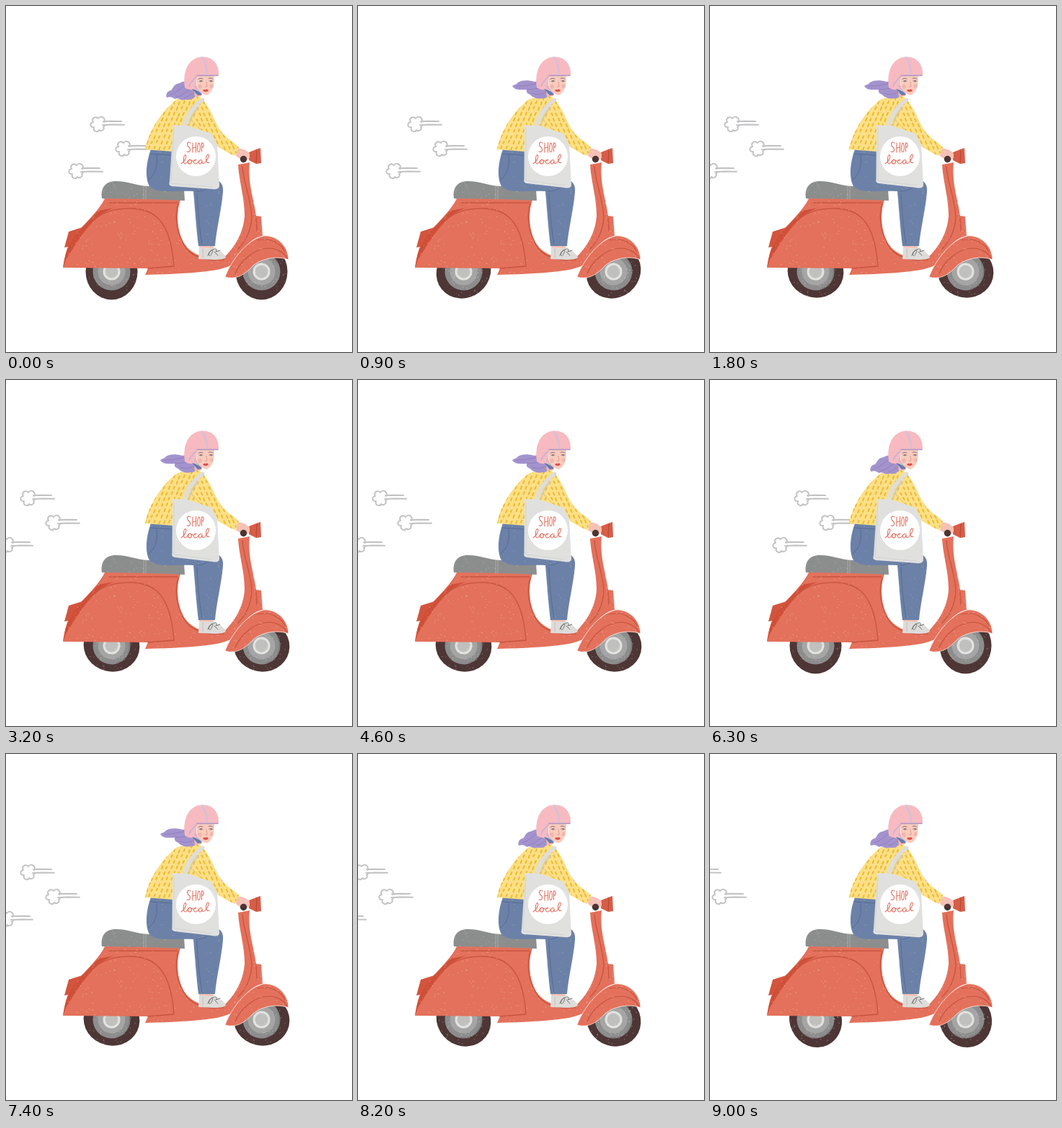
Recreate the animation shown at these times as an HTML page. Size 480x480 px, loop 9.1 s.

```html
<!DOCTYPE html>
<html lang="en">
<head>
<meta charset="utf-8">
<title>Scooter ride</title>
<style>
html, body { margin: 0; width: 100%; height: 100%; overflow: hidden; background: #fff; }
svg { display: block; width: 100%; height: 100%; }
.line { fill: none; stroke-linecap: round; stroke-linejoin: round; }
</style>
</head>
<body>
<svg viewBox="0 0 480 480" role="img" aria-label="Woman on a scooter with a bag reading: SHOP local">
  <defs>
    <path id="body" d="M79 363C82 346 84 332 97 316C106 305 129 284 137 267L243 267C235 285 237 315 249 332C256 341 265 346 280 349L301 350C317 336 330 314 331 290C331 266 323 242 322 220L338 217C335 245 344 268 347 291L354 292L356 319C338 322 328 340 313 359C300 367 270 371 193 373L197 364Z"/>
    <path id="fender" d="M304 376C309 360 331 325 357 319C375 317 392 333 392 352C376 346 355 350 343 360C334 369 323 381 304 376Z"/>
    <path id="jacket" d="M238 129C222 140 199 168 193 199L232 202L280 183C291 194 305 203 318 208L323 196C318 190 309 186 301 177C291 166 287 149 279 138C274 131 269 124 262 124Z"/>
    <path id="jeans" d="M201 199L234 201V239L290 241C298 243 302 248 301 258C299 282 292 309 290 333L267 333C264 309 262 280 260 257C232 256 207 260 199 250C192 237 195 215 201 199Z"/>
    <path id="seat" d="M133 267C131 252 138 243 152 243C171 243 181 250 200 250L247 254L248 270L200 268Z"/>
    <clipPath id="bodyClip"><use href="#body"/><use href="#fender"/></clipPath>
    <clipPath id="jacketClip"><use href="#jacket"/></clipPath>
    <clipPath id="jeansClip"><use href="#jeans"/></clipPath>
    <clipPath id="seatClip"><use href="#seat"/></clipPath>
    <g id="puff" class="line" stroke="#c2c2c4" stroke-width="1.9">
      <path d="M19 9C22 3 14 -1 11 4C7 0 1 4 4 9C-1 10 -1 17 5 16C3 22 10 24 12 20C15 23 21 19 18 16C20 15 20 14 19 13"/>
      <path d="M18 8.2L28 7.8L43 8M17 13.2L30 12.5L47 12.8"/>
    </g>
    <g id="wheel">
      <ellipse rx="36" ry="39" fill="#4d3635"/>
      <circle r="26" fill="#8d8d8d"/>
      <circle r="19" fill="#a5a5a5"/>
      <circle r="12" fill="#e2e2e0"/>
      <circle r="9" fill="#c0c0be"/>
      <path class="line" d="M-17 -18A25 25 0 0 1 22 -12" stroke="#797878"/>
      <g class="wheelSpecks"></g>
    </g>
  </defs>

  <g id="puffs">
    <use href="#puff" x="117" y="152"/>
    <use href="#puff" x="152" y="186"/>
    <use href="#puff" x="87" y="217"/>
  </g>

  <g class="spin" data-x="146.5"><use href="#wheel"/></g>
  <g class="spin" data-x="354.5"><use href="#wheel"/></g>

  <path d="M81 335L87 313L106 307L108 315L92 333Z" fill="#d2553d"/>
  <use href="#body" fill="#e3715b"/>
  <path d="M79 363C82 346 84 332 97 316L128 284L150 280C121 290 103 320 83 352Z" fill="#d04f38"/>
  <g class="line" stroke="#c75440" stroke-width="1.3">
    <path d="M117 302C130 287 148 280 178 281C204 283 217 296 225 318C230 333 232 346 233 361L197 364"/>
    <path d="M239 274C233 294 237 317 250 336C257 345 268 350 283 352L302 352"/>
    <path d="M328 223C329 243 340 268 341 293C340 309 334 325 322 337M347 294L348 312"/>
    <path d="M143 273L238 273"/>
  </g>
  <use href="#fender" fill="#e3715b" stroke="#fff" stroke-width=".7"/>
  <path class="line" d="M318 371C326 352 345 337 364 336C377 336 386 343 390 350M349 325C368 321 382 330 387 341" stroke="#c75440" stroke-width="1.2"/>
  <g id="bodySpecks" clip-path="url(#bodyClip)"></g>

  <use href="#seat" fill="#8c8d8d"/>
  <path class="line" d="M191 250V268M194 250V268" stroke="#a9aaaa"/>
  <g id="seatSpecks" clip-path="url(#seatClip)"></g>

  <path d="M268 331H288V339H268Z" fill="#f4c3b5"/>
  <path d="M268 335L287 336C294 338 302 342 305 348C304 351 298 352 289 352L267 351Z" fill="#dedcda"/>
  <path class="line" d="M280 346C283 337 289 336 286 342C284 349 279 347 283 341C288 336 295 335 291 341L297 339M289 341L294 346" stroke="#67686d" stroke-width=".9"/>
  <path class="line" d="M273 337V349" stroke="#bdbbb9" stroke-width=".9"/>
  <use href="#jeans" fill="#6c81a7"/>
  <g class="line" stroke="#566c96">
    <path d="M200 205L230 207M209 207C211 221 207 236 197 241M265 260C266 284 268 309 272 330M264 257C275 257 281 252 285 249"/>
  </g>
  <g id="jeansSpecks" clip-path="url(#jeansClip)"></g>

  <path d="M337 203L347 199L353 197L354 218L347 219L337 214Z" fill="#d65d48"/>
  <path class="line" d="M348 200L347 217" stroke="#b9442f"/>
  <path d="M321 198C326 197 333 199 338 205L338 211L330 216L319 208Z" fill="#f5c1b4"/>
  <circle cx="329.5" cy="212.500" r="4.700" fill="#4b3433"/>

  <use href="#jacket" fill="#fcdf86"/>
  <g id="dashes" class="line" stroke="#ecbe36" stroke-width="2.2" clip-path="url(#jacketClip)"></g>
  <path class="line" d="M256 157C263 166 276 176 289 187" stroke="#e3b840" stroke-width=".8"/>

  <g class="line" stroke="#dcdddd">
    <path d="M247 168C250 150 261 139 273 130" stroke-width="5"/>
    <path d="M254 167C255 157 260 147 267 141" stroke-width="2" stroke="#cbcccb"/>
  </g>
  <path id="bag" fill="#e0e1df"/>
  <path id="bagEdge" class="line" stroke="#cfd0ce" stroke-width=".8"/>
  <circle cx="263.5" cy="208.5" r="27.5" fill="#fff"/>
  <g class="line" stroke="#e27363" stroke-width="1.1">
    <path d="M256 190C252 187 250 192 253 195C257 198 256 204 251 202M259 190V203M263.500 189.500V203M259 197L263.500 196M267.500 190C265 193 265 202.500 267.500 202.500C270 202 270 191 267.500 190M271.500 202V190C275 189 275 196 271.500 196"/>
    <path d="M243 219C249 215 251 208 249 206.500C246 207 245 219 249 219C252 218 252 213 255 213C258 214 258 219 255 219C252 219 252 214 255 213C259 216 261 215 264 213.500C260 212 259 219 263 219C266 219 267 213 271 213.500C267 213 266 219 269 219C272 219 272 214 272 214C272 221 275 219 277 216C281 211 283 206 280 206C277 208 276 220 282 217"/>
  </g>

  <path id="hair" fill="#a393cd"/>
  <path id="hairLines" class="line" stroke="#8f7cbd" stroke-width=".9"/>

  <path d="M260 113L272 120L271 125L262 126Z" fill="#f2b8aa"/>
  <path d="M264 95H288.500C289.500 107 288 117 281 122.500C276 126 269 120 265 112Z" fill="#f8cbbd"/>
  <path d="M248 113C245 92 252 71 273 70.500C288 70.500 296 82 295 96L266 96C263 103 264 111 266 116C260 117 253 117 248 113Z" fill="#f7bac0"/>
  <path class="line" d="M272 72C277 78 279 87 279 95" stroke="#d2c0da" stroke-width="2.6"/>
  <path class="line" d="M265 96.500L294 96.500" stroke="#a796c4" stroke-width="1.3"/>
  <path class="line" d="M254 111C256 106 260 102 264 98M262 111L271 122" stroke="#c3b3d6" stroke-width="1.7"/>
  <path d="M258 115C263 116 269 119 272 123L266 124Z" fill="#627ab0"/>
  <circle cx="269" cy="112" r="3" fill="#f3a59f" opacity=".6"/>
  <circle cx="285" cy="111" r="2.600" fill="#f3a59f" opacity=".6"/>
  <g class="line" stroke="#7b6470" stroke-width=".9">
    <path d="M267 101.500C269 100 271 100 273 101M281 100.500C283 99.500 285 100 287 101M268 104.500C270 103 272 103.500 273 104.500M282 104C284 103 286 103.500 287 104.500"/>
    <path d="M278 105L279 112L276 112" stroke="#df998c"/>
  </g>
  <g fill="#566982"><circle cx="270.500" cy="104.600" r="1"/><circle cx="284.500" cy="104.400" r="1"/></g>
  <path d="M273 117C275 115 276 116 277 116C279 115 280 116 281 117C279 120 275 120 273 117Z" fill="#d9534f"/>
</svg>

<script>
const $ = id => document.getElementById(id);
const NS = "http://www.w3.org/2000/svg";

let seed = 17;
const rand = () => (seed = seed * 16807 % 2147483647) / 2147483647;

function addPath(parent, d, attrs = {}) {
  const path = document.createElementNS(NS, "path");
  path.setAttribute("d", d);
  for (const key in attrs) path.setAttribute(key, attrs[key]);
  parent.append(path);
}

// Chalky flecks; each spot comes from the given place function.
function specks(parent, count, place, opacity) {
  let d = "";
  for (let i = 0; i < count; i++) {
    const [x, y] = place();
    d += `M${x.toFixed(1)} ${y.toFixed(1)}l${(.2 + rand() * .8).toFixed(1)} .4`;
  }
  addPath(parent, d, { stroke: "#fff", "stroke-width": .8, "stroke-linecap": "round", opacity });
}
const inBox = (x, y, w, h) => () => [x + rand() * w, y + rand() * h];
const inDisc = radius => () => {
  const angle = rand() * Math.PI * 2, r = radius * Math.sqrt(rand());
  return [r * Math.cos(angle), r * Math.sin(angle)];
};

specks($("bodySpecks"), 330, inBox(79, 265, 314, 112), .45);
specks($("seatSpecks"), 40, inBox(133, 243, 115, 27), .3);
specks($("jeansSpecks"), 80, inBox(193, 199, 108, 135), .3);
specks(document.querySelector(".wheelSpecks"), 55, inDisc(34), .42);

// Brush dashes on the jacket, staggered by row.
let dashes = "";
for (let row = 0; row < 11; row++) {
  for (let col = 0; col < 20; col++) {
    const x = 189 + col * 6.8 + (row % 2) * 3.4 + rand() * 1.4;
    const y = 124 + row * 7.8 + rand() * 2;
    const lean = x > 262 ? 1.3 : -1.2;
    dashes += `M${x.toFixed(1)} ${y.toFixed(1)}l${lean} ${(2.4 + rand() * 1.2).toFixed(1)}`;
  }
}
addPath($("dashes"), dashes);

const poses = [
  {
    hair: "M263 107C254 102 246 104 241 107C232 108 231 116 229 117C223 118 221 124 223 127C229 125 232 127 234 129C240 126 242 132 249 130C258 131 263 127 266 121Z",
    hairLines: "M256 109C244 109 240 120 228 123M259 115C250 116 246 126 236 126M261 121C256 122 253 127 248 127",
    bag: "M232 165L252 166L285 177L293 192L296 250C295 254 291 255 286 254L230 250C226 249 226 247 227 243Z",
    bagEdge: "M233 170L229 246L286 251"
  },
  {
    hair: "M263 105C256 102 249 104 245 105C235 102 226 103 222 106C219 110 216 109 214 111C217 116 223 117 234 116C233 120 236 122 239 123C244 129 252 129 259 128C263 127 265 124 266 121Z",
    hairLines: "M256 108C244 106 234 112 220 111M258 114C248 113 243 117 235 115M261 120C254 122 248 124 241 121",
    bag: "M231 165L252 166L285 177L293 192L296 249C295 253 291 253 286 252L234 246C230 245 230 243 230.500 240Z",
    bagEdge: "M233 170L233 242L286 249"
  }
];
const poseAt = [0, 0, 1, 1, 1, 0, 0];
const drift = [0, -24, -48, -72, -97, -123, -149];
const STEP = 100, LOOP = 9100;
const wheels = document.querySelectorAll(".spin");
let shown = -1;

function draw(time) {
  const step = Math.floor(time % LOOP / STEP) % drift.length;
  if (step === shown) return;
  shown = step;
  $("puffs").setAttribute("transform", `translate(${drift[step]} 0)`);
  const turn = step * 180 / drift.length;
  for (const wheel of wheels)
    wheel.setAttribute("transform", `translate(${wheel.dataset.x} 368.500) rotate(${turn})`);
  for (const [id, d] of Object.entries(poses[poseAt[step]])) $(id).setAttribute("d", d);
}

const start = performance.now();
function tick() {
  draw(performance.now() - start);
  requestAnimationFrame(tick);
}
tick();
</script>
</body>
</html>
```
